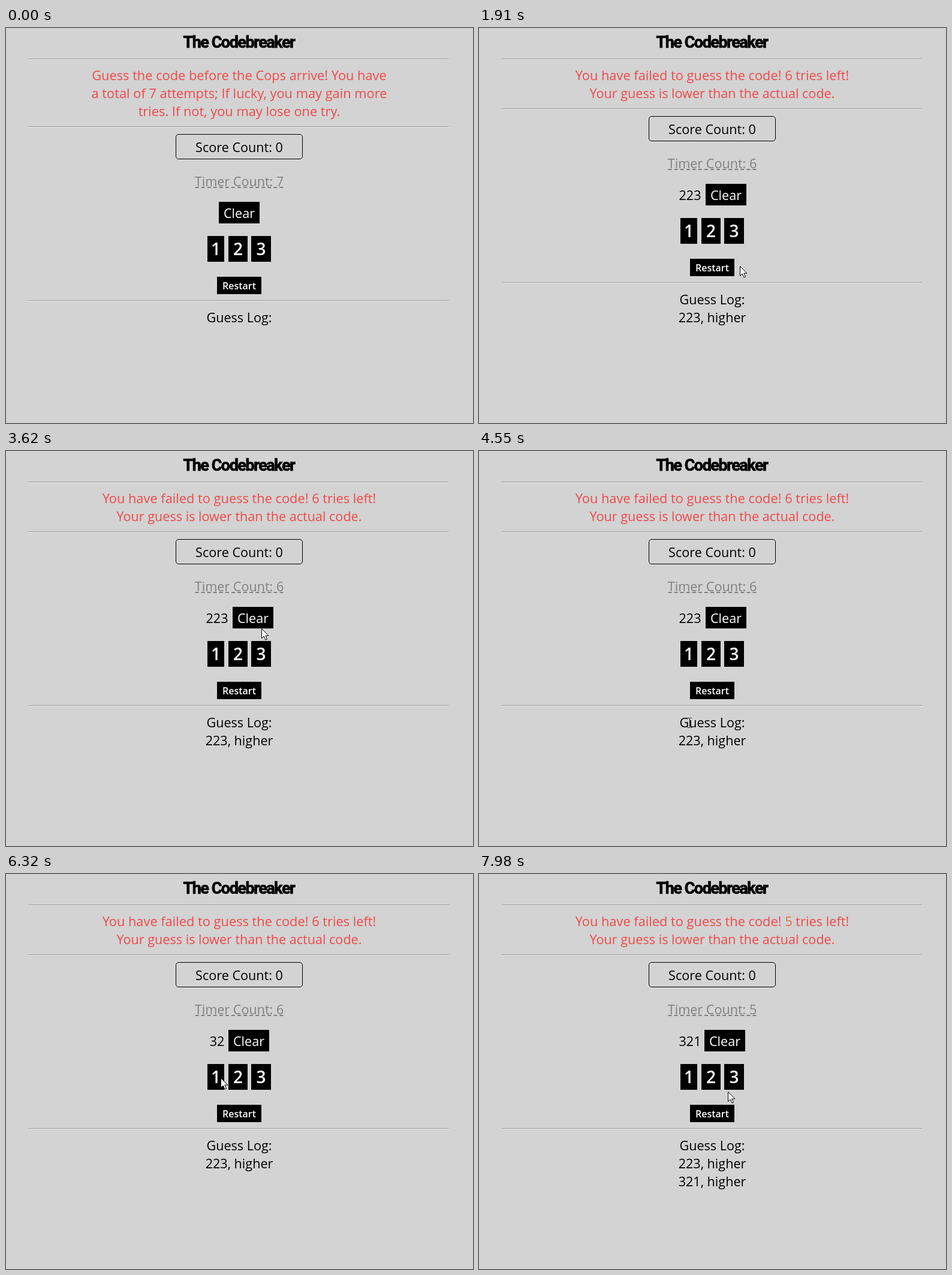
An HTML page with a canvas for the animation above (8000 ms loop, 779 by 659 pixels).

```html
<!DOCTYPE html>
<html lang="en">
<head>
<meta charset="utf-8">
<title>Code guessing game</title>
<style>
  html, body { margin: 0; width: 100%; height: 100%; overflow: hidden; background: #d3d3d3; }
  canvas { display: block; }
</style>
</head>
<body>
<canvas id="stage" width="779" height="659"></canvas>
<script>
const ctx = document.getElementById('stage').getContext('2d');
const LOOP = 8000, TICK = 65.95, MID = 389, LINE = 30;
const SANS = '"Open Sans", "Noto Sans", sans-serif';
const BODY = '21.6px ' + SANS;
const MESSAGE = '21.8px ' + SANS;
const RED = '#f04848', ORANGE = '#ea6c3c', GRAY = '#808080';

// Digits in the order they are clicked; three make a guess
const DIGITS = '223321', CLICKS = [18, 22, 28, 81, 90, 99];

// Pointer stops, with an optional control point for curved moves
const START = { x: 713, y: 640 };
const MOVES = [
  { from: 1, to: 4, x: 422, y: 366 },
  { from: 7, to: 12, x: 391, y: 370 },
  { from: 22, to: 26, x: 425, y: 374 },
  { from: 28, to: 33, x: 476, y: 490 },
  { from: 38, to: 51, x: 380, y: 262, bend: { x: 282, y: 524 } },
  { from: 53, to: 57, x: 414, y: 340, bend: { x: 455, y: 290 } },
  { from: 64, to: 69, x: 351, y: 453 },
  { from: 71, to: 78, x: 417, y: 342 },
  { from: 83, to: 87, x: 390, y: 341 },
  { from: 91, to: 96, x: 350, y: 340 },
  { from: 99, to: 105, x: 384, y: 516 },
  { from: 110, to: 121, x: 415, y: 363, bend: { x: 330, y: 210 } }
];

function text(str, x, y, color = '#000', font = BODY, align = 'center') {
  ctx.font = font;
  ctx.fillStyle = color;
  ctx.textAlign = align;
  ctx.fillText(str, x, y);
}

function lines(list, y, color, font) {
  list.forEach((str, i) => text(str, MID, y + i * LINE, color, font));
}

function rect(x, y, w, h, color) {
  ctx.fillStyle = color;
  ctx.fillRect(x, y, w, h);
}

function rule(y) {
  rect(38, y, 701, 1, '#9a9a9a');
  rect(39, y + 1, 701, 1, '#eaeaea');
}

function button(label, x, y, w, h, base, font) {
  rect(x, y, w, h, '#000');
  text(label, x + w / 2, base, '#fff', font);
}

function title() {
  ctx.letterSpacing = '-1.5px';
  text('The Codebreaker', MID - 0.5, 33, '#000', 'bold 27px Roboto, sans-serif');
  ctx.strokeStyle = '#000';
  ctx.lineWidth = 0.7;
  ctx.strokeText('The Codebreaker', MID - 0.5, 33);
  ctx.letterSpacing = '0px';
}

function message(guesses) {
  if (!guesses) {
    lines([
      'Guess the code before the Cops arrive! You have',
      'a total of 7 attempts; If lucky, you may gain more',
      'tries. If not, you may lose one try.'
    ], 87, RED, MESSAGE);
    return;
  }
  const parts = ['You have failed to guess the code! ', String(7 - guesses), ' tries left!'];
  ctx.font = MESSAGE;
  let x = MID - ctx.measureText(parts.join('')).width / 2;
  parts.forEach((str, i) => {
    text(str, x, 87, i === 1 && guesses > 1 ? ORANGE : RED, MESSAGE, 'left');
    x += ctx.measureText(str).width;
  });
  text('Your guess is lower than the actual code.', MID, 87 + LINE, RED);
}

function codeRow(code) {
  const clearW = 67.5, gap = code ? 6.5 : 0;
  const w = [...code].reduce((sum, d) => sum + (d === '1' ? 9.7 : 13.2), 0);
  const left = MID - (w + gap + clearW) / 2;
  text(code, left + w / 2, 317);
  button('Clear', Math.floor(left + w + gap), 290, 68, 36, 317, '500 ' + BODY);
}

function scoreBox() {
  ctx.strokeStyle = '#000';
  ctx.lineWidth = 1;
  ctx.beginPath();
  ctx.roundRect(283.5, 177.5, 211, 41, 4.5);
  ctx.stroke();
  text('Score Count: 0', MID, 207);
}

function timer(tries) {
  text('Timer Count: ' + tries, MID, 264, GRAY);
  ctx.strokeStyle = GRAY;
  ctx.lineWidth = 2;
  ctx.setLineDash([6, 4.07]);
  ctx.stroke(new Path2D('M315.5 266H462.5'));
  ctx.setLineDash([]);
}

function panel(code, log) {
  rule(164);
  scoreBox();
  timer(7 - log.length);
  codeRow(code);
  const keyFont = '600 28px ' + SANS;
  button('1', 336, 347, 28, 43, 379, keyFont);
  button('2', 371, 347, 32, 43, 379, keyFont);
  button('3', 409, 347, 33, 43, 379, keyFont);
  button('Restart', 352, 415, 74, 29, 436, '600 16px ' + SANS);
  rule(454);
  lines(['Guess Log:', ...log.map(guess => guess + ', higher')], 491);
}

function arrow(x, y) {
  const shape = new Path2D('M0 0V16L3.7 12.6L6.5 18.6L9 17.6L6.3 11.6H11.3Z');
  ctx.save();
  ctx.translate(x + 0.5, y + 0.5);
  ctx.fillStyle = '#fff';
  ctx.strokeStyle = '#000';
  ctx.lineWidth = 1;
  ctx.fill(shape);
  ctx.stroke(shape);
  ctx.restore();
}

function beam(x, y) {
  ctx.strokeStyle = '#222';
  ctx.lineWidth = 1;
  ctx.stroke(new Path2D(
    `M${x - 3} ${y - 7.5}h3m1 0h3M${x - 3} ${y + 8.5}h3m1 0h3M${x + 0.5} ${y - 7}v15`));
}

function pointerAt(tick) {
  let at = START;
  for (const move of MOVES) {
    if (tick < move.from) break;
    const k = Math.min(1, (tick - move.from) / (move.to - move.from));
    const mid = move.bend || { x: (at.x + move.x) / 2, y: (at.y + move.y) / 2 };
    const curve = axis => Math.round(
      (1 - k) ** 2 * at[axis] + 2 * k * (1 - k) * mid[axis] + k * k * move[axis]);
    at = { x: curve('x'), y: curve('y') };
  }
  return at;
}

function pointer(tick, guesses) {
  if (tick < MOVES[0].from) return;
  const { x, y } = pointerAt(tick);
  const top = guesses ? 440 : 470;
  const overLog = x > 332 && x < 447 && y > top && y < top + LINE * (guesses + 1);
  (overLog ? beam : arrow)(x, y);
}

function draw(now) {
  // Everything advances in even ticks
  const tick = Math.floor((now % LOOP + 8) / TICK);
  const count = CLICKS.filter(t => t <= tick).length;
  const typed = DIGITS.slice(0, count);
  const log = typed.match(/.{3}/g) || [];
  const code = count ? typed.slice(Math.floor((count - 1) / 3) * 3) : '';

  rect(0, 0, 779, 659, '#d3d3d3');
  title();
  rule(51);
  message(log.length);
  ctx.save();
  if (log.length) ctx.translate(0, -LINE);
  panel(code, log);
  ctx.restore();
  pointer(tick, log.length);
}

const start = performance.now();
function frame() {
  draw(performance.now() - start);
  requestAnimationFrame(frame);
}
frame();
</script>
</body>
</html>
```
